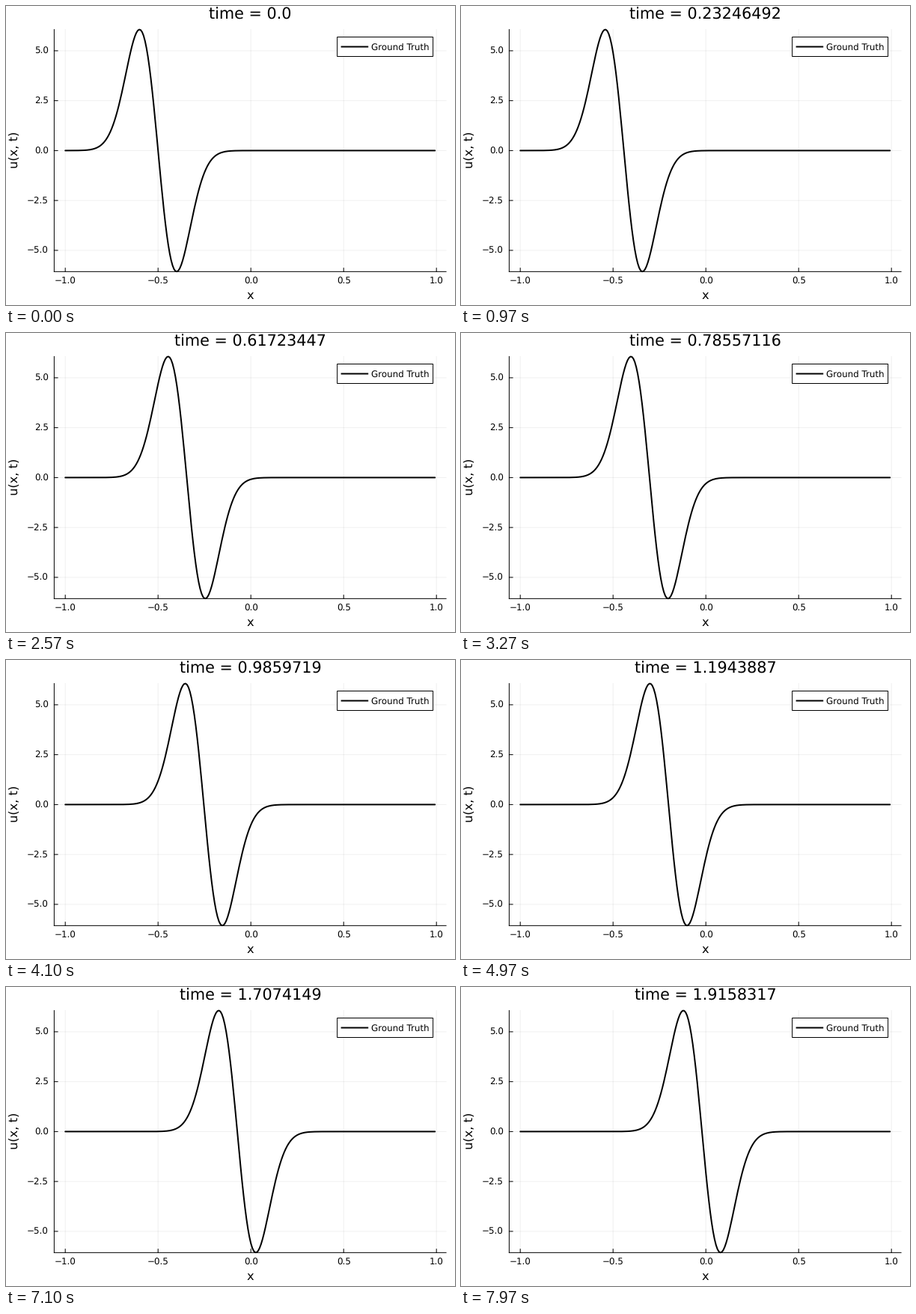
Animation of 600 by 400 pixels, one loop 8 s. Source, as a matplotlib script:

```python
import numpy as np
import matplotlib.pyplot as plt
from matplotlib.animation import FuncAnimation
from matplotlib.collections import LineCollection
from matplotlib.patches import Rectangle

W, H, DPI = 600, 400, 100
PT = 72 / DPI                      # points per pixel
LOOP, TICK, FPS = 8000, 10, 30     # ms, ms, pictures per second
X0, XUNIT = 327.2, 248.0
Y0, YUNIT = 193.4, 26.7
TICK_PX, LABEL_PX, TITLE_PX = 11.9, 16.3, 20.8
SIGMA, START, SPEED, STEP = 0.1, -0.5, 0.25, 4 / 499

plt.rcParams["font.family"] = "DejaVu Sans"
plt.rcParams["text.hinting"] = "no_hinting"

fig = plt.figure(figsize=(W / DPI, H / DPI), dpi=DPI, facecolor="white")
ax = fig.add_axes([0, 0, 1, 1])
ax.set_xlim(0, W)
ax.set_ylim(H, 0)
ax.axis("off")


def px(x):
    return X0 + XUNIT * x


def py(y):
    return Y0 - YUNIT * y


def lines(segments, alpha=1.0, z=2):
    ax.add_collection(LineCollection(
        segments, colors="black", linewidths=PT, alpha=alpha, zorder=z,
        capstyle="projecting", snap=False), autolim=False)


def thick(xs, ys, cap, z):
    return ax.plot(xs, ys, color="black", lw=2 * PT, zorder=z, snap=False,
                   solid_capstyle=cap, solid_joinstyle="round")[0]


def label(x, y, text, size, ha="center", **kw):
    return ax.text(x, y, text, fontsize=size * PT, ha=ha, va="baseline",
                   color="black", zorder=6, **kw)


def number(v):
    return f"{v:.1f}".replace("-", "\u2212")


# the frame hugs the data: 3 % margin in x, none in y
xs = np.arange(256) / 128 - 1
margin = 0.03 * (xs[-1] - xs[0])
peak = np.exp(-0.5) / SIGMA
left, right = px(xs[0] - margin), px(xs[-1] + margin)
top, bottom = py(peak), py(-peak)

grid, frame = [], [[(left, top), (left, bottom)], [(left, bottom), (right, bottom)]]
for v in (-1.0, -0.5, 0.0, 0.5, 1.0):
    x = px(v)
    grid.append([(x, top), (x, bottom)])
    frame.append([(x, bottom), (x, bottom - 4.7)])
    label(x, 372, number(v), TICK_PX)
for v in (-5.0, -2.5, 0.0, 2.5, 5.0):
    y = py(v)
    grid.append([(left, y), (right, y)])
    frame.append([(left, y), (left + 4.7, y)])
    label(56.8, y + 4.4, number(v), TICK_PX, ha="right")
lines(grid, alpha=0.06, z=1)
lines(frame)

label(326.3, 391.5, "x", LABEL_PX)
label(16.3, 192.7, "u(x, t)", LABEL_PX, rotation=90, rotation_mode="anchor")

# legend
ax.add_patch(Rectangle((442.6, 41.5), 128, 26, facecolor="white",
                       edgecolor="black", lw=PT, zorder=4, snap=False))
thick([447.6, 484.2], [54.5, 54.5], "butt", 5)
label(488, 59.2, "Ground Truth", TICK_PX, ha="left")

curve = thick([], [], "round", 3)
title = label(326.4, 18, "", TITLE_PX)


def wave(t):
    d = xs - START - SPEED * t
    return -d / SIGMA**2 * np.exp(-d**2 / (2 * SIGMA**2))


def update(tick):
    # pictures start at multiples of 1/30 s rounded to whole ticks
    i = int((tick + 0.5) * TICK * FPS / 1000)
    t = i * STEP
    curve.set_data(px(xs), py(wave(t)))
    title.set_text(f"time = {np.float32(t)!s}")
    return curve, title


anim = FuncAnimation(fig, update, frames=LOOP // TICK, interval=TICK,
                     init_func=lambda: update(0), repeat=True,
                     repeat_delay=0, blit=False)
plt.show()
```
